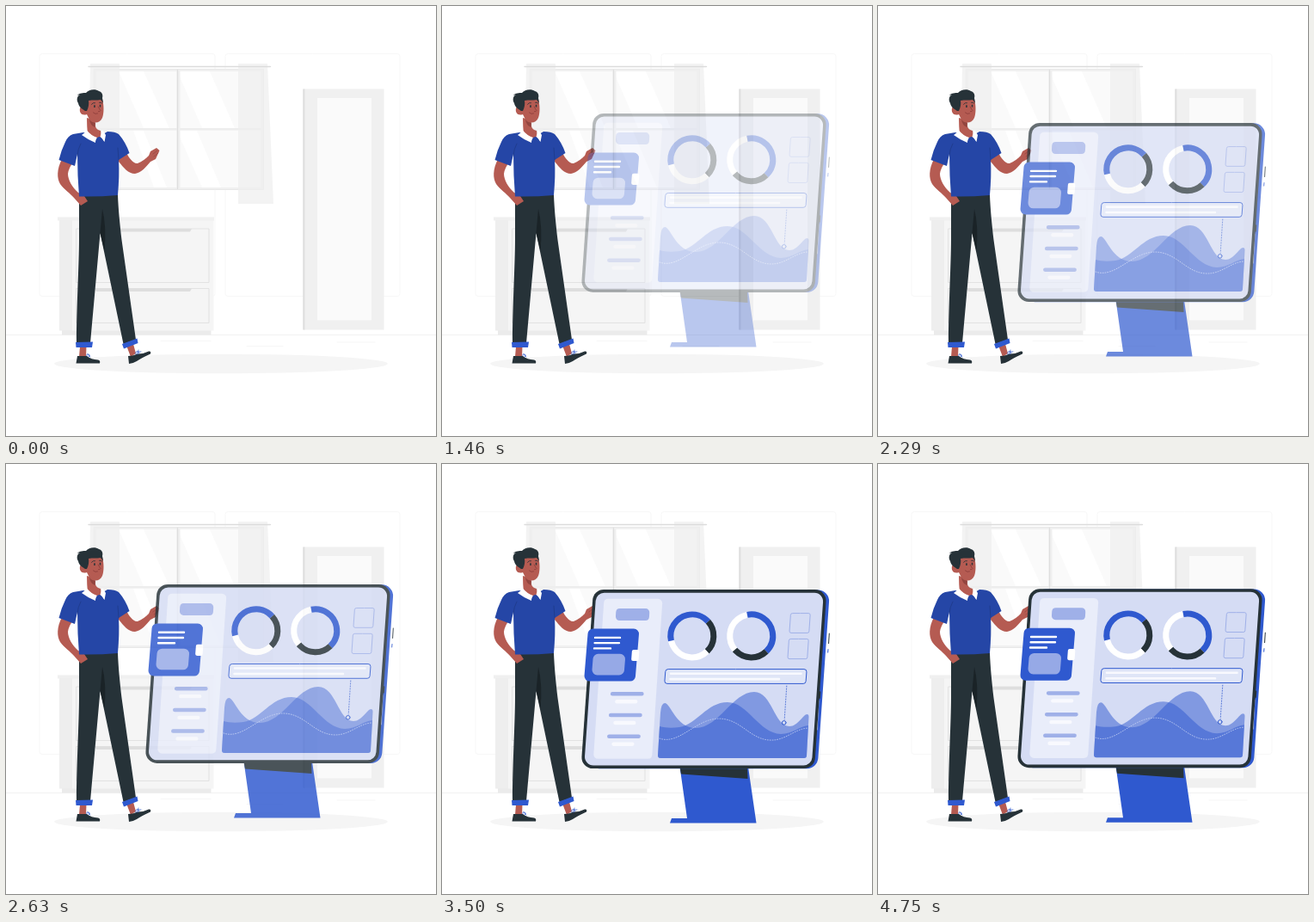
Animation of 500x500 px, one loop 4790 ms. Source, as an HTML page with a canvas:

```html
<!DOCTYPE html>
<html lang="en">
<head>
<meta charset="utf-8">
<title>Dashboard presentation</title>
<style>
html, body { margin: 0; width: 100%; height: 100%; overflow: hidden; background: #fff; }
canvas { display: block; width: 500px; height: 500px; }
</style>
</head>
<body>
<canvas id="stage"></canvas>
<script>
const SIZE = 500, LOOP = 4790, DROP = 30;
const BLUE = '#2f59cf', SHIRT = '#2546a6', DARK = '#263238', SKIN = '#b55b52';
const PALE = '#d5dcf4', TINT = '#9fb0e8';
const ratio = Math.max(1, window.devicePixelRatio || 1);

function layer(canvas) {
  canvas.width = canvas.height = SIZE * ratio;
  const c = canvas.getContext('2d');
  c.scale(ratio, ratio);
  c.lineCap = c.lineJoin = 'round';
  return c;
}
const stage = layer(document.getElementById('stage'));
const room = layer(document.createElement('canvas'));
const screen = layer(document.createElement('canvas'));

const fill = (c, color, d) => { c.fillStyle = color; c.fill(new Path2D(d)); };

function line(c, color, width, d, dash = []) {
  c.strokeStyle = color;
  c.lineWidth = width;
  c.setLineDash(dash);
  c.stroke(new Path2D(d));
  c.setLineDash([]);
}

function box(c, color, x, y, w, h) {
  c.fillStyle = color;
  c.fillRect(x, y, w, h);
}

function frame(c, color, width, x, y, w, h) {
  c.strokeStyle = color;
  c.lineWidth = width;
  c.strokeRect(x, y, w, h);
}

// Rounded parallelogram whose bottom edge is shifted left by lean.
function slab(x, y, w, h, lean, r) {
  const p = new Path2D();
  p.moveTo(x + w / 2, y);
  p.arcTo(x + w, y, x + w - lean, y + h, r);
  p.arcTo(x + w - lean, y + h, x - lean, y + h, r);
  p.arcTo(x - lean, y + h, x, y, r);
  p.arcTo(x, y, x + w, y, r);
  p.closePath();
  return p;
}

function fillSlab(c, color, ...shape) {
  c.fillStyle = color;
  c.fill(slab(...shape));
}

function strokeSlab(c, color, width, ...shape) {
  c.strokeStyle = color;
  c.lineWidth = width;
  c.stroke(slab(...shape));
}

function ring(c, x, y, parts) {
  c.lineCap = 'butt';
  c.lineWidth = 7;
  for (const [color, from, to] of parts) {
    c.strokeStyle = color;
    c.beginPath();
    c.arc(x, y, 25, from * Math.PI / 180, to * Math.PI / 180);
    c.stroke();
  }
  c.lineCap = 'round';
}

function drawWindow(c) {
  box(c, '#f0f0f0', 102, 73, 198, 141);
  frame(c, '#e6e6e6', 0.8, 102.5, 73.5, 197, 140);
  box(c, '#fafafa', 105, 76, 191, 135);
  fill(c, '#fff', 'M131 76H160L190 142H160ZM148 145H160L187 211H172ZM201 76H237L266 142H228L201 80ZM201 145H222L250 211H228L201 150Z');
  box(c, '#ededed', 105, 142, 191, 2.5);
  box(c, '#f0f0f0', 198.5, 74, 4, 139);
  box(c, '#dedede', 198.8, 74, 1.4, 139);
  c.globalAlpha = 0.75;
  fill(c, '#efefef', 'M98 67H132V205H96ZM270 67H304L311 230H270Z');
  c.globalAlpha = 1;
  line(c, '#dcdcdc', 1.4, 'M96 70.5H307.5');
}

function drawFurniture(c) {
  box(c, '#f0f0f0', 346, 96.5, 93.5, 280);
  box(c, '#dfdfdf', 345.2, 96.5, 2.3, 280);
  box(c, '#fafafa', 362, 107, 63, 258.5);

  box(c, '#ebebeb', 65, 376, 173.5, 6.5);
  box(c, '#f5f5f5', 77, 248, 164.5, 129.5);
  box(c, '#eeeeee', 62, 248, 15, 129.5);
  box(c, '#f0f0f0', 60, 245.5, 182, 4);
  for (const [y, h] of [[259, 62.5], [328.5, 40]]) {
    frame(c, '#e0e0e0', 0.9, 82, y, 154, h);
    fill(c, '#dedede', `M103 ${y}H216L214 ${y + 3.5}H105Z`);
  }
}

function drawHead(c) {
  fill(c, SKIN, 'M94 130L103 133L104 140Q105 144 110 145L111 153L106 158L95 150Q94 140 94 130Z');
  fill(c, SKIN, 'M91 109Q101 103 112 108C114 116 114 124 112 130C109 137 101 137 97 132L94 126C88 128 85 124 86 119C87 116 90 117 92 120Z');
  fill(c, '#93453f', 'M97 132Q100 136 104 135.5L103.5 141Q98 139 97 132Z');
  fill(c, DARK, 'M92 122C88 119 85 118 84 113C82 110 82 105 86 103L83 104C85 101 90 101 93 101C96 97 104 96 108 99C112 100 113 104 112 107L113 113L110 109C105 110 101 109 96 110Q97 116 94 122Z');
  fill(c, DARK, 'M102.2 115.3h1.5v2.8h-1.5ZM108.8 114.8h1.4v2.8h-1.4Z');
  line(c, DARK, 0.8, 'M99.5 114.3Q101 112 103.5 112.6M108.5 112.3Q110 111.5 111.5 113');
  line(c, '#8f3f3b', 0.9, 'M107.2 117Q109 121 110 121.5Q109.5 123 107.5 122.7M101.5 124Q103.5 126.3 106.5 125');
}

function drawPerson(c) {
  // trousers
  fill(c, DARK, 'M85 220L130 219.5C130.500 235 132.500 255 134.500 272L151 388L136.500 393L109.500 264L98 392H82C82 350 85 300 85 272Z');
  fill(c, '#1a2327', 'M112 236Q117 255 114.500 285L109.500 264Z');
  // feet
  fill(c, SKIN, 'M86 396H93.500L93 408H85ZM140.500 396L148 393L151 404L145 408Z');
  fill(c, BLUE, 'M81 391L101 390.500L100 397H81.500ZM135 393L152.500 386.500L153.500 392L137 398.500Z');
  fill(c, DARK, 'M83 407H94Q99 411 107 411.500Q110 412 109 415.500H81.500ZM142 407Q149 406.500 152 404.500Q159 405 166 401.500Q169 401 168 404.500Q158 409 152 413Q147 416 143 416Z');
  line(c, BLUE, 0.7, 'M94 407Q93 404 96 405Q99 406 96 408M98 408L95 405M151 405Q150 401 153 402Q157 403 153 405M154 400L153 404M153 402L157 402');
  // arms
  fill(c, SKIN, 'M65 178C59 190 59 200 63 207C68 214 75 218 79 223L87 232L95 227L91 221L84 217C77 211 72 202 72 195Q73 188 78 182Z');
  fill(c, SKIN, 'M131 178L140 171C143 176 148 184 153 183C158 181 163 177 166 174L168 169L175 165L178.500 168L174 178L168 181C163 187 157 194 150 195C142 195 137 188 131 181Z');
  line(c, '#8f433e', 0.6, 'M171 172L176 168M172 175L177 171');
  // shirt
  fill(c, SHIRT, 'M90 147L78 149Q72 151 69 158Q64 168 61.500 179L80 186L83 172Q83 198 85 221.500Q108 222 130 220Q132 198 131 179L143.500 171Q139 158 131 149Q127 146 118 146L108 152Z');
  line(c, '#1d3885', 0.7, 'M83 174Q83.500 166 87 160M131 179L130 165');
  drawHead(c);
  fill(c, '#fff', 'M94.500 145L88 150Q96 156 104 159L106 153Q98 150 94.500 145ZM112 144L116 150L114.500 158L109.500 152Z');
  fill(c, SHIRT, 'M104 160Q104 152 109 152Q113 154 114 160Z');
}

function drawRoom(c) {
  box(c, '#fff', 0, 0, SIZE, SIZE);
  strokeSlab(c, '#f5f5f5', 0.8, 39, 55.5, 204, 282, 0, 3);
  strokeSlab(c, '#f5f5f5', 0.8, 255, 55.5, 203, 282, 0, 3);
  line(c, '#ededed', 0.7, 'M0 382.500H500');
  line(c, '#f0f0f0', 0.6, 'M280 395.500H322M385 391H429M180 389.500H238');
  drawWindow(c);
  drawFurniture(c);
  c.fillStyle = '#f5f5f5';
  c.beginPath();
  c.ellipse(250, 416, 194, 11.3, 0, 0, Math.PI * 2);
  c.fill();
  drawPerson(c);
}

function drawStand(c) {
  fill(c, BLUE, 'M276.500 351H356L365.500 416.500H265L267 411H285Z');
  fill(c, DARK, 'M276.500 351H355L355.500 365L278 359.500Z');
}

function drawCard(c) {
  fillSlab(c, BLUE, 170, 190.5, 59.5, 61, 5, 6);
  fillSlab(c, '#fff', 221, 214.8, 8.5, 13.2, 1, 2);
  line(c, '#fff', 2.4, 'M178 200.800H207M177.600 207H206M177 213.300H196');
  fillSlab(c, '#96a9e6', 176, 219.7, 37.5, 24.6, 2, 6);
}

function drawChart(c) {
  c.globalAlpha = 0.5;
  fill(c, BLUE, 'M254 288Q255 277 259 277C266 277 272 306 295 306C322 306 338 264 363 264C384 264 386 304 404 304C414 304 420 290 424.500 290Q426.500 290 426.500 293L424 338Q424 341 421 341H254Q251 341 251 338Z');
  fill(c, BLUE, 'M253 304C260 306 268 306 276 305C296 302 308 276 332 276C356 276 368 312 394 313C408 313 415 304 426 303L424 338Q424 341 421 341H254Q251 341 251 338Z');
  c.globalAlpha = 1;
  line(c, '#cbd6f5', 0.8, 'M253 318C276 326 295 295 322 295C348 295 358 320 383 320C400 320 410 307 425 306', [0.8, 2]);
  line(c, BLUE, 0.8, 'M400.800 257L398.200 296', [1, 2]);
  c.strokeStyle = BLUE;
  c.lineWidth = 1;
  c.beginPath();
  c.arc(397.7, 299.8, 2.3, 0, Math.PI * 2);
  c.stroke();
}

function drawMonitor(c) {
  drawStand(c);
  fillSlab(c, BLUE, 183, 145.3, 268, 207.8, 14.5, 13);
  line(c, DARK, 1.6, 'M439.500 264L439 271');
  line(c, '#fff', 0.9, 'M438 274L436 308');
  line(c, BLUE, 1, 'M449 214.500L448.700 218');
  line(c, DARK, 1, 'M450.300 196L449.600 207.500');
  fillSlab(c, DARK, 176, 145, 271.5, 208, 14.5, 13);
  fillSlab(c, PALE, 179.3, 148.6, 264.5, 200.8, 14, 10);

  fillSlab(c, '#e9edfa', 188.5, 155.7, 68, 186, 12.5, 5);
  fillSlab(c, TINT, 202.5, 167, 39, 14, 0.8, 4.5);
  for (let i = 0; i < 3; i++) {
    const x = 196 - i * 1.9, y = 264 + i * 24.7;
    fillSlab(c, TINT, x, y, 38.8, 4.5, 0.3, 2.2);
    fillSlab(c, '#f8f9fe', x + 5.3, y + 9, 26.2, 4.4, 0.3, 2.2);
  }
  drawCard(c);

  ring(c, 290.8, 198.8, [[DARK, -42, 46], ['#fff', 46, 167], [BLUE, 167, 318]]);
  ring(c, 359.7, 198.8, [['#fff', 140, 259], [BLUE, 259, 406], [DARK, 46, 140]]);
  strokeSlab(c, TINT, 1, 405.5, 172.5, 22.8, 22.8, 1.6, 2);
  strokeSlab(c, TINT, 1, 403.5, 202.3, 22.8, 23.2, 1.6, 2);

  fillSlab(c, '#dfe5f7', 260, 237.5, 164.2, 16.8, 1.3, 3);
  strokeSlab(c, BLUE, 1, 260, 237.5, 164.2, 16.8, 1.3, 3);
  line(c, '#f8f9fe', 2.6, 'M266 242.600H417.500M265.500 249H392');
  drawChart(c);
}

// Cubic easing that dips slightly below 0 and overshoots 1.
function ease(x) {
  const curve = (s, a, b) => 3 * (1 - s) ** 2 * s * a + 3 * (1 - s) * s * s * b + s ** 3;
  let lo = 0, hi = 1;
  for (let i = 0; i < 30; i++) {
    const mid = (lo + hi) / 2;
    if (curve(mid, 0.36, 0.5) < x) lo = mid; else hi = mid;
  }
  return curve(lo, -0.01, 1.38);
}

function render() {
  const progress = ease(performance.now() % LOOP / LOOP);
  screen.clearRect(0, 0, SIZE, SIZE);
  screen.save();
  screen.translate(0, DROP * (progress - 1));
  drawMonitor(screen);
  screen.restore();

  stage.globalAlpha = 1;
  stage.drawImage(room.canvas, 0, 0, SIZE, SIZE);
  stage.globalAlpha = Math.min(1, Math.max(0, progress));
  stage.drawImage(screen.canvas, 0, 0, SIZE, SIZE);
  requestAnimationFrame(render);
}

drawRoom(room);
render();
</script>
</body>
</html>
```
